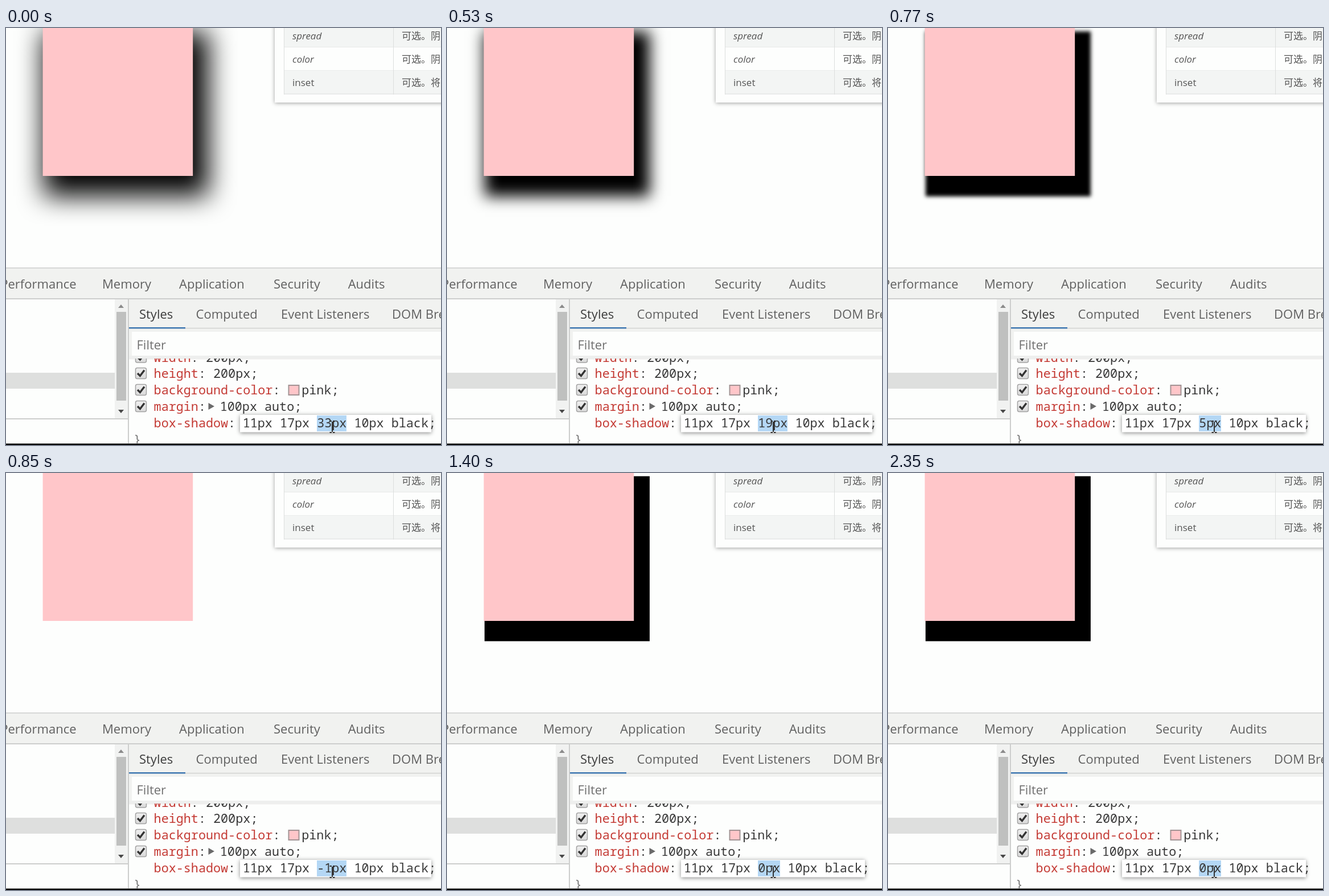
An HTML page with a canvas that plays this animation: 764 by 733 pixels, repeating every 2430 ms.

```html
<!DOCTYPE html>
<html lang="en">
<head>
<meta charset="utf-8">
<title>box-shadow blur</title>
<style>
  html, body { margin: 0; width: 100%; height: 100%; overflow: hidden; background: #fdfefd; }
  canvas { display: block; }
</style>
</head>
<body>
<canvas id="stage" width="764" height="733"></canvas>
<script>
const ctx = document.getElementById('stage').getContext('2d');

const LOOP = 2430;
const ZOOM = 1.32;
const PAGE = '#fdfefd', PANEL = '#f1f2f0', RULE = '#cdcecd', PINK = '#ffc6c9';
const INK = '#383838', RED = '#c43a34', LABEL = '#606060';
const UI = '22px "Open Sans", "Noto Sans", sans-serif';
const CODE = '21.75px "Noto Sans Mono", "DejaVu Sans Mono", monospace';
const CELL = 13.05;
const CODE_X = 259.6;

// [start time in ms, blur value in px]
const BLUR_STEPS = [
  [0, 33], [70, 32], [300, 31], [380, 28], [460, 24], [530, 19],
  [610, 14], [690, 10], [770, 5], [850, -1], [1400, 0]
];

function blurAt(ms) {
  let value = BLUR_STEPS[0][1];
  for (const [start, blur] of BLUR_STEPS) if (ms >= start) value = blur;
  return value;
}

function rect(x, y, w, h, color) {
  ctx.fillStyle = color;
  ctx.fillRect(x, y, w, h);
}

function text(str, x, y, font, color, align = 'left') {
  ctx.font = font;
  ctx.fillStyle = color;
  ctx.textAlign = align;
  ctx.fillText(str, x, y);
}

function triangle(color, ...points) {
  ctx.fillStyle = color;
  ctx.beginPath();
  for (const [x, y] of points) ctx.lineTo(x, y);
  ctx.fill();
}

function clipped(x, y, w, h, draw) {
  ctx.save();
  ctx.beginPath();
  ctx.rect(x, y, w, h);
  ctx.clip();
  draw();
  ctx.restore();
}

function shadowed(color, blur, dx, dy, draw) {
  ctx.save();
  ctx.shadowColor = color;
  ctx.shadowBlur = blur;
  ctx.shadowOffsetX = dx;
  ctx.shadowOffsetY = dy;
  draw();
  ctx.restore();
}

function drawBox(blur) {
  const x = 64.6, y = -3.6, size = 263.6, spread = 10 * ZOOM;
  // A negative blur is invalid CSS, so the shadow disappears.
  if (blur >= 0) {
    const sx = x + 11 * ZOOM - spread, sy = y + 17 * ZOOM - spread;
    const side = size + 2 * spread;
    const away = 2000;
    clipped(0, 0, 764, 421, () => {
      shadowed('#000', blur * ZOOM, away, 0, () => rect(sx - away, sy, side, side, '#000'));
    });
  }
  rect(x, y, size, size, PINK);
}

function drawTable() {
  shadowed('rgba(0,0,0,.38)', 7, 0, 1, () => rect(472, -20, 320, 151, PAGE));
  const rows = [['spread', '可选。阴', true], ['color', '可选。阴', true], ['inset', '可选。将', false]];
  rows.forEach(([name, note, italic], i) => {
    const top = -7 + 41 * i;
    rect(489, top, 275, 41, i % 2 ? PAGE : '#f3f5f4');
    rect(489, top + 40.5, 275, 1, '#dcdedd');
    text(name, 503, top + 27, `${italic ? 'italic ' : ''}17px "Open Sans", "Noto Sans", sans-serif`, '#555');
    text(note, 695, top + 27, '17px "Noto Sans CJK SC", "Noto Sans CJK", sans-serif', '#555');
  });
  rect(488, 0, 1, 117, '#dcdedd');
  rect(680, 0, 1, 117, '#dcdedd');
}

function drawTabs() {
  rect(0, 421, 764, 56, PANEL);
  rect(0, 421, 764, 1.5, RULE);
  rect(0, 475, 764, 2, RULE);
  text('Performance', 123.5, 458, UI, LABEL, 'right');
  const tabs = [['Memory', 169], ['Application', 304], ['Security', 470], ['Audits', 600.7]];
  for (const [label, x] of tabs) text(label, x, 458, UI, LABEL);

  rect(216, 477, 548, 52, PANEL);
  rect(216, 527, 548, 1.5, RULE);
  rect(216, 526, 99, 3, '#3d76b0');
  text('Styles', 234, 511, UI, '#3c3c3c');
  const subtabs = [['Computed', 333.5], ['Event Listeners', 483], ['DOM Breakpoints', 678]];
  for (const [label, x] of subtabs) text(label, x, 511, UI, LABEL);
}

function drawTree() {
  rect(0, 477, 214, 253, PAGE);
  rect(0, 606, 191, 28, '#dedfde');
  rect(191, 477, 23, 209, '#f1f2f1');
  rect(194, 499, 17, 156, '#bfc0bf');
  triangle('#8b8b8b', [197, 492], [202, 486], [207, 492]);
  triangle('#484848', [197, 671], [207, 671], [202, 677]);
  rect(0, 686, 215, 2, RULE);
  rect(214, 477, 2, 253, RULE);
}

function checkbox(y) {
  const fill = ctx.createLinearGradient(0, y, 0, y + 20);
  fill.addColorStop(0, '#f1f1f1');
  fill.addColorStop(1, '#d9d9d9');
  ctx.fillStyle = fill;
  ctx.strokeStyle = '#a3a3a3';
  ctx.lineWidth = 1.5;
  ctx.beginPath();
  ctx.roundRect(227.5, y + 0.5, 19, 19, 3);
  ctx.fill();
  ctx.stroke();
  ctx.strokeStyle = '#333';
  ctx.lineWidth = 3.4;
  ctx.beginPath();
  ctx.moveTo(231, y + 10);
  ctx.lineTo(235.5, y + 14.5);
  ctx.lineTo(243, y + 4.5);
  ctx.stroke();
}

function property(name, y, checked = true) {
  if (checked) checkbox(y - 18);
  text(name, CODE_X, y, CODE, RED);
  text(':', CODE_X + name.length * CELL, y, CODE, INK);
}

function drawEditor(blur) {
  const head = '11px 17px ', edited = `${blur}px`;
  const value = `${head}${edited} 10px black`;
  const left = 415.7, y = 702;
  const end = left + value.length * CELL;
  const selection = Math.round(left + head.length * CELL);
  shadowed('rgba(0,0,0,.45)', 7, 0, 1, () => rect(411, 680, Math.round(end + 5) - 411, 30.5, '#fff'));
  rect(selection, 681, Math.round(edited.length * CELL), 28, '#b4d7f5');
  text(`${value};`, left, y, CODE, INK);
}

function drawPointer() {
  rect(572, 692, 2, 18, '#333');
  for (const y of [690, 710]) {
    rect(568.5, y, 3.5, 2, '#333');
    rect(574, y, 3.5, 2, '#333');
  }
}

function drawStyles(blur) {
  rect(216, 528.5, 548, 54, PANEL);
  rect(221, 534, 543, 42, PAGE);
  text('Filter', 229.5, 565, UI, '#707070');
  rect(216, 576, 548, 6, '#eeefee');

  clipped(216, 581, 548, 149, () => {
    property('width', 586.5);
    text('200px;', CODE_X + 7 * CELL, 586.5, CODE, INK);

    property('height', 615);
    text('200px;', CODE_X + 8 * CELL, 615, CODE, INK);

    property('background-color', 644);
    rect(495.5, 627, 20, 19, '#a29394');
    rect(497.5, 629, 16, 15, PINK);
    text('pink;', 519.2, 644, CODE, INK);

    property('margin', 673);
    triangle('#6a6a6a', [355.5, 659], [366, 665], [355.5, 671]);
    text('100px auto;', 375.7, 673, CODE, INK);

    property('box-shadow', 702, false);
    text('}', 224, 731, CODE, '#777');
  });
  drawEditor(blur);
  drawPointer();
}

function render(ms) {
  const blur = blurAt(ms);
  rect(0, 0, 764, 733, PAGE);
  drawBox(blur);
  drawTable();
  drawTabs();
  drawTree();
  drawStyles(blur);
  rect(0, 730.5, 764, 2.5, '#000');
}

const began = performance.now();
function tick() {
  render((performance.now() - began) % LOOP);
  requestAnimationFrame(tick);
}
tick();
</script>
</body>
</html>
```
